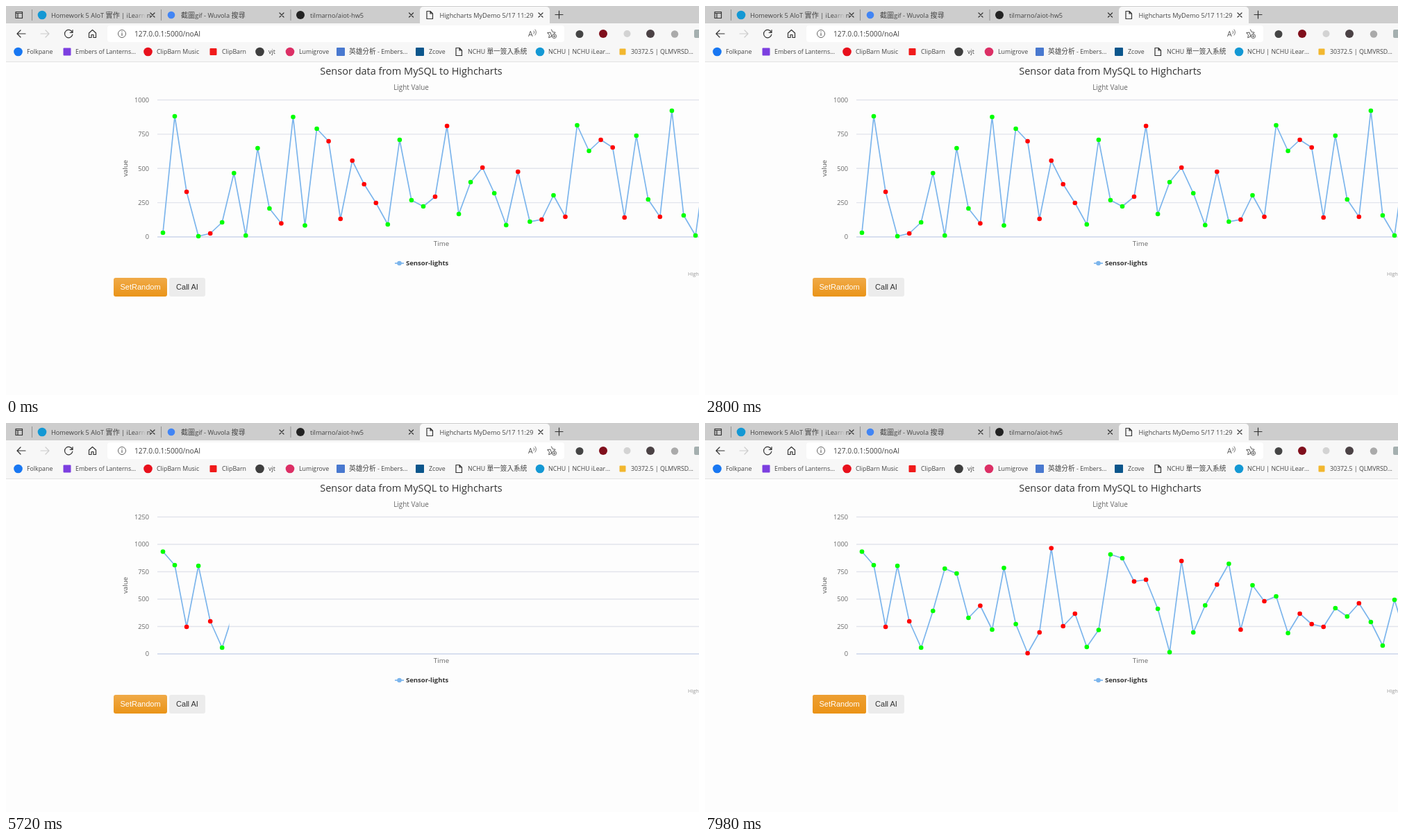
An HTML page for the animation above (8000 ms loop, 998 px wide and 561 px high).

```html
<!DOCTYPE html>
<html lang="zh-Hant">
<head>
<meta charset="utf-8">
<title>Sensor chart reload</title>
<style>
  html, body { margin: 0; width: 100%; height: 100%; overflow: hidden; background: #fdfdfd; }
  svg { display: block; width: 100%; height: 100%; font-family: "Open Sans", "Noto Sans CJK TC", "Noto Sans CJK", sans-serif; }
  .icon { fill: none; stroke: #333; stroke-width: 1.2; stroke-linecap: round; stroke-linejoin: round; }
  .button { font: 11px "Liberation Sans", Arial, sans-serif; }
</style>
</head>
<body>
<svg id="stage" viewBox="0 0 998 561" preserveAspectRatio="none"></svg>
<script>
const LOOP = 8000;
const HOVER = 3600, CLICK = 3900, LOADED = 4880, DRAW = 5073, DRAW_MS = 2800, HOVER_AGAIN = 7700;
const PLOT = { left: 218, width: 818, firstX: 226, step: 17.044, zeroY: 333, topY: 135.5 };

// Marker heights in pixels and their colours (g = green, r = red)
const before = {
  max: 1000,
  ys: [327, 159, 268, 332, 328, 312, 241, 331, 205, 292, 313.5, 160, 316.5, 177, 195, 307,
       223, 257, 284, 315, 193, 280, 289, 275, 173, 300, 254, 233, 270, 316, 239, 311,
       308, 273, 304, 172, 209, 193, 204, 305, 187, 279, 304, 151, 302, 331, 209],
  colors: 'ggrgrgggggrgggrrrrrggggrrggrggrgrgrggrrrggrgggg'
};
const after = {
  max: 1250,
  ys: [185.5, 205, 294, 206, 286, 324, 271, 210, 217, 281, 263.5, 298, 209, 290, 332, 302,
       180.5, 293, 275, 323, 298.5, 189.5, 195, 228.5, 226, 268, 330.5, 199, 302, 263, 233, 203,
       298, 234, 257, 250, 303, 275, 290, 294, 267, 279, 260, 287, 321, 255, 312],
  colors: 'ggrgrgggggrgggrrrrrggggrrggrggrgrgrggrrrggrgggg'
};

const text = (x, y, size, content, fill = '#444', attrs = '') =>
  `<text x="${x}" y="${y}" font-size="${size}" fill="${fill}" ${attrs}>` +
  content.replace(/[\u4e00-\u9fff]+/g, `<tspan font-size="${size + 0.9}">$&</tspan>`) + '</text>';
const rect = (x, y, w, h, fill, r = 0, attrs = '') =>
  `<rect x="${x}" y="${y}" width="${w}" height="${h}" rx="${r}" fill="${fill}" ${attrs}/>`;
const dot = (x, y, r, fill, attrs = '') => `<circle cx="${x}" cy="${y}" r="${r}" fill="${fill}" ${attrs}/>`;
const line = (x1, y1, x2, y2, color, width = 1) =>
  `<path d="M${x1} ${y1}L${x2} ${y2}" stroke="${color}" stroke-width="${width}"/>`;
const icon = (d, attrs = '') => `<path class="icon" d="${d}" ${attrs}/>`;
const cross = (x, y, s) => icon(`M${x - s} ${y - s}l${2 * s} ${2 * s}m0 ${-2 * s}l${-2 * s} ${2 * s}`);
const page = (x, y) => icon(`M${x - 4} ${y - 5.5}h5l3.5 3.5v7.5h-8.5zm5 0v3.5h3.5`);
const square = (x, y, fill, s = 12) => rect(x - s / 2, y - s / 2, s, s, fill, 1);

function tabs() {
  return rect(0, 0, 998, 26, '#cdcdcd') +
    rect(596, 1, 187, 30, '#f7f7f7', 5) +
    [37.5, 223.5, 410].map(x => line(x, 5, x, 21, '#909090')).join('') +
    icon('M14 8.5h9.5v9h-9.5zm0 2h9.5m-6.5 0v7') +
    dot(52, 13, 6.3, '#1398d4') + text(65, 16.5, 9.2, 'Homework 5 AIoT 實作 | iLearnin') +
    rect(184, 5, 18, 16, 'url(#fade)') +
    dot(238, 13, 5.3, '#4285f4') + text(252, 16.5, 9.2, '截圖gif - Wuvola 搜尋') +
    dot(424, 13, 6, '#222') + text(438, 16.5, 9.2, 'tilmarno/aiot-hw5') +
    [211, 397, 583.5, 770].map(x => cross(x, 13, 3)).join('') +
    icon('M791 12.5h11m-5.5-5.5v11');
}

function toolbar() {
  return rect(0, 25, 998, 55, '#f7f7f7') +
    rect(146, 28, 658, 24, '#fff', 4) +
    icon('M28 40h-12m5-5l-5 5l5 5') +
    icon('M50 40h12m-5-5l5 5l-5 5', 'style="stroke:#ccc"') +
    icon('M119.5 39l5-4.5l5 4.5v6.5h-3.5v-4h-3v4h-3.5z') +
    dot(167, 40, 5.5, 'none', 'stroke="#666"') + line(167, 39, 167, 43, '#666', 1.2) + dot(167, 37.2, .7, '#666') +
    text(185, 43.7, 10.25, '127.0.0.1:5000/noAI') +
    text(752, 44, 10.5, 'A', '#555') + icon('M760 36q2 2 0 4m2-6q3 4 0 8', 'style="stroke:#666;stroke-width:.9"') +
    icon('M785.5 34l1.7 3.6l4 .5l-2.5 2.5m-3.2 3.4l-3.8 1.8l.8-4l-2.8-3.2l4-.5z', 'style="stroke:#555;stroke-width:1"') +
    dot(789.5, 43.5, 3, 'none', 'stroke="#555"') + icon('M788 43.5h3m-1.5-1.5v3', 'style="stroke:#555;stroke-width:.8"') +
    dot(826, 40.5, 5.5, '#454545') + dot(860, 40, 6, '#800f1c') + dot(894.5, 40, 5, '#d3d3d3') +
    dot(928, 40, 6, '#4b4245') + dot(963, 40.5, 5.2, '#aaa') + rect(991, 34, 10, 12, '#a5b0b0', 2);
}

function bookmarks() {
  const label = (x, content) => text(x, 69.2, 8.8, content);
  return dot(17.5, 66, 6.3, '#1877f2') + label(30, 'Folkpane') +
    square(88, 66, '#7c3fe0', 11) + label(100, 'Embers of Lanterns...') +
    dot(204.5, 66, 6.3, '#e8101c') + label(217, 'ClipBarn Music') +
    square(298.5, 66, '#f01a1a', 10) + label(311, 'ClipBarn') +
    dot(365.5, 66, 6.3, '#3e3e3e') + label(378, 'vjt') +
    dot(409, 66, 6.3, '#dc2f65') + label(422, 'Lumigrove') +
    square(482, 66, '#4878cf') + label(494, '英雄分析 - Embers...') +
    square(596, 66, '#0b568c') + label(609, 'Zcove') +
    page(652, 66) + label(665, 'NCHU 單一簽入系統') +
    dot(769, 66, 6.3, '#1398d4') + label(781, 'NCHU | NCHU iLear...') +
    square(888, 66, '#f2b72f', 9) + label(900, '30372.5 | QLMVRSD...') +
    line(0, 80.5, 998, 80.5, '#e2e2e2');
}

function axes({ max }) {
  let out = '';
  for (let value = 0; value <= max; value += 250) {
    const y = PLOT.zeroY - value / max * (PLOT.zeroY - PLOT.topY);
    out += line(PLOT.left, y, 998, y, value ? '#e2e4ec' : '#ccd6eb', 1.3) +
      text(206, y + 3.4, 9.2, String(value), '#666', 'text-anchor="end"');
  }
  return out;
}

function series({ ys, colors }) {
  const points = ys.map((y, i) => [PLOT.firstX + i * PLOT.step, y]);
  return `<polyline points="${points.join(' ')}" fill="none" stroke="#7cb5ec" stroke-width="1.7" stroke-linejoin="round"/>` +
    points.map(([x, y], i) => dot(x.toFixed(1), y, 3.3, colors[i] === 'g' ? '#0f0' : '#f00')).join('');
}

function chartLabels() {
  return text(583.5, 99, 14.5, 'Sensor data from MySQL to Highcharts', '#333', 'text-anchor="middle"') +
    text(583.5, 121, 9.95, 'Light Value', '#666', 'text-anchor="middle"') +
    text(0, 0, 9.7, 'value', '#555', 'text-anchor="middle" transform="translate(174.5 234) rotate(-90)"') +
    text(627, 346, 9.7, 'Time', '#666', 'text-anchor="middle"') +
    line(560, 371, 573, 371, '#7cb5ec', 1.7) + dot(566.5, 371, 3.3, '#7cb5ec') +
    text(576, 374.3, 9.5, 'Sensor-lights', '#333', 'font-weight="700"') +
    text(982, 388.5, 7.4, 'Highcharts.com', '#999');
}

function buttons() {
  return rect(155, 392, 77, 27, 'url(#orange)', 3) +
    rect(155, 392, 77, 27, 'url(#orangeHover)', 3, 'id="hover"') +
    `<g id="focus">${rect(155, 392, 77, 27, '#fdfdfd')}${rect(156.2, 393.2, 74.6, 24.6, '#eb9620', 2, 'stroke="#1a1a1a" stroke-width="2"')}</g>` +
    text(193.5, 409.2, 11, 'SetRandom', '#fff', 'class="button" text-anchor="middle"') +
    rect(235, 392, 52, 27, '#ececec', 3) +
    text(261, 409.2, 11, 'Call AI', '#333', 'class="button" text-anchor="middle"');
}

const gradient = (id, from, to, attrs = 'x2="0" y2="1"') =>
  `<linearGradient id="${id}" ${attrs}><stop stop-color="${from}"/><stop offset="1" stop-color="${to}"/></linearGradient>`;

const stage = document.getElementById('stage');
stage.innerHTML = `<defs>
    ${gradient('orange', '#f0aa48', '#ea9418')}
    ${gradient('orangeHover', '#ed9f32', '#eb9316')}
    ${gradient('fade', 'rgba(205,205,205,0)', '#cdcdcd', '')}
    <clipPath id="reveal"><rect id="revealRect" x="${PLOT.left}" y="130" width="0" height="210"/></clipPath>
  </defs>
  ${rect(0, 0, 998, 561, '#fdfdfd')}${tabs()}${toolbar()}${bookmarks()}
  <g id="idle">${page(610, 13)}${text(624.5, 16.5, 9.2, 'Highcharts MyDemo 5/17 11:29')}
    ${icon('M95.6 38.2a5.7 5.7 0 1 0 .2 3m.2-6.5v3.7h-3.7')}</g>
  <g id="loading"><g id="spinner">${dot(605, 12, 1.2, '#2a62b8')}${dot(608.3, 16.8, 1.4, '#2a62b8')}</g>
    ${text(625, 16.5, 9.2, '127.0.0.1:5000/noAI')}${cross(90.3, 40, 4.5)}</g>
  <g id="before">${axes(before)}${series(before)}</g>
  <g id="after">${axes(after)}<g clip-path="url(#reveal)">${series(after)}</g></g>
  ${chartLabels()}${buttons()}`;

const find = id => document.getElementById(id);
const show = (id, visible) => find(id).setAttribute('display', visible ? 'inline' : 'none');

function render(t) {
  const loading = t >= CLICK && t < LOADED;
  show('idle', !loading);
  show('loading', loading);
  show('before', t < LOADED);
  show('after', t >= LOADED);
  show('hover', (t >= HOVER && t < LOADED) || t >= HOVER_AGAIN);
  show('focus', loading);
  find('spinner').setAttribute('transform', `rotate(${(t - 4080) * 0.2} 610 13)`);
  const progress = Math.min(1, Math.max(0, (t - DRAW) / DRAW_MS));
  find('revealRect').setAttribute('width', PLOT.width * (1 - Math.cos(Math.PI * progress)) / 2);
}

const start = performance.now();
function tick() {
  render((performance.now() - start) % LOOP);
  requestAnimationFrame(tick);
}
tick();
</script>
</body>
</html>
```
